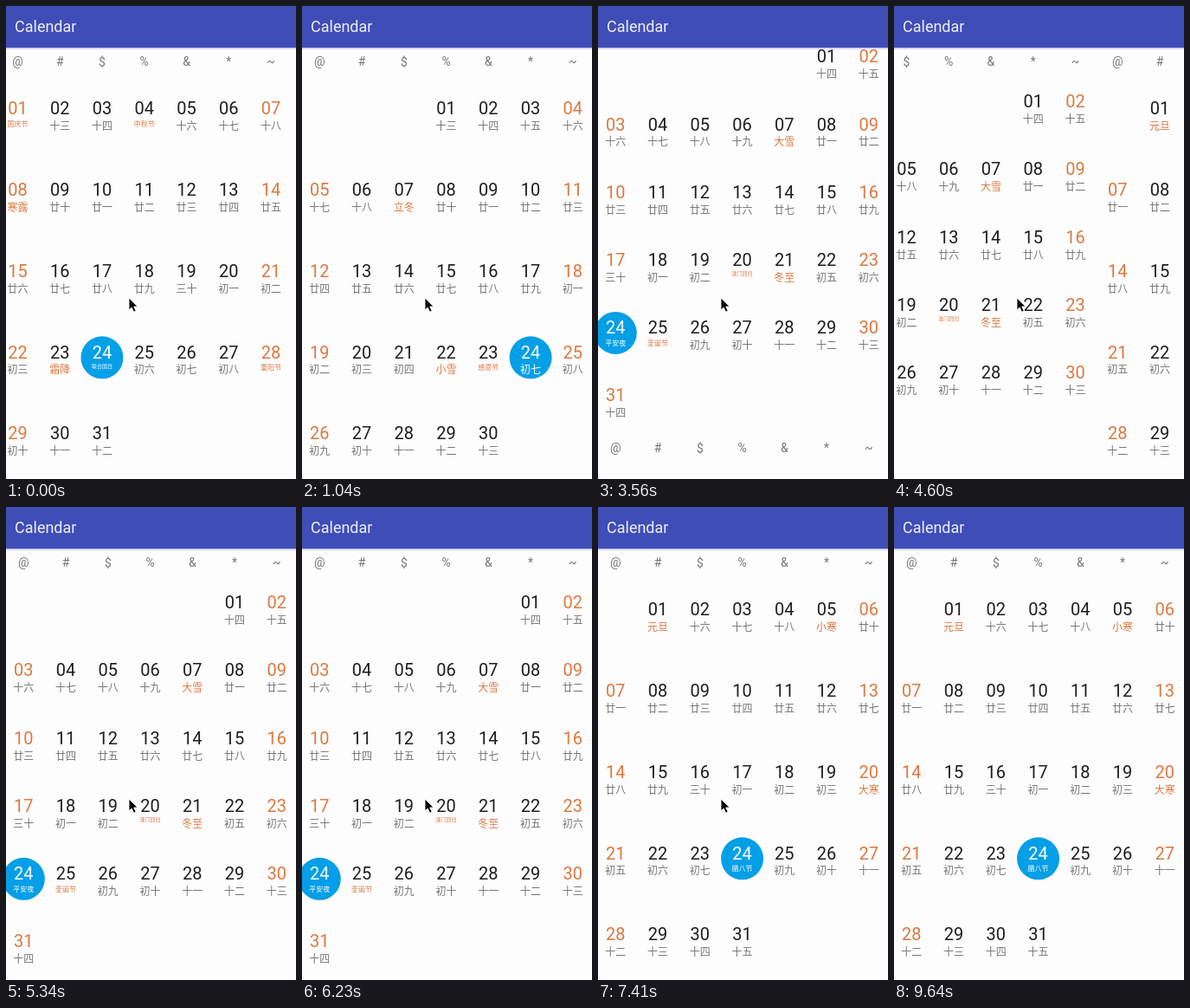
An HTML page that plays this animation: 335x546 px, repeating every 9.92 s.

```html
<!DOCTYPE html>
<html lang="zh-CN">
<head>
<meta charset="utf-8">
<title>Calendar</title>
<style>
html, body { margin: 0; width: 100%; height: 100%; overflow: hidden; background: #fdfdfd; }
svg { display: block; width: 335px; height: 546px; }
text { font-family: Roboto, "Noto Sans CJK SC", "Noto Sans CJK", sans-serif; }
.mid { text-anchor: middle; }
.week { font-size: 14px; fill: #757575; }
.day { font-size: 20px; fill: #1e1e1e; }
.lunar { font-family: "Noto Sans CJK SC", "Noto Sans CJK", sans-serif; fill: #757575; }
.hot { fill: #dd7840; }
.on { fill: #fff; }
</style>
</head>
<body>
<svg id="stage" viewBox="0 0 335 546">
  <defs>
    <linearGradient id="shade" x1="0" y1="0" x2="0" y2="1">
      <stop offset="0" stop-color="#8f97cf" stop-opacity=".75"/>
      <stop offset="1" stop-color="#d5d8ec" stop-opacity="0"/>
    </linearGradient>
  </defs>
  <g id="pages"></g>
  <rect y="48" width="335" height="3" fill="url(#shade)"/>
  <rect width="335" height="48" fill="#3f4db7"/>
  <text x="10" y="30.3" font-size="18" fill="#eef0fb">Calendar</text>
  <path id="cursor" d="M142 337v14l3.2-3 2.4 5.2 2.6-1.1-2.4-5.1h4.4z" fill="#000" stroke="#fff" stroke-width=".9"/>
</svg>
<script>
const LOOP = 9920, TICK = 148.3, LAST = 65;
const COL = 48.76, LEFT = 20.3, WIDE = COL * 7, TALL = 498;
const TOP = 71, GRID = 469.3, PICKED = 24;
const DIGITS = '一二三四五六七八九十';

// first: weekday of day 1; moon: lunar day of day 1; len: days in that lunar month
const MONTHS = [
  { days: 31, first: 0, moon: 12, len: 30, feasts: { 1: '国庆节', 4: '中秋节', 8: '寒露', 23: '霜降', 24: '联合国日', 28: '重阳节' } },
  { days: 30, first: 3, moon: 13, len: 29, feasts: { 7: '立冬', 22: '小雪', 23: '感恩节' } },
  { days: 31, first: 5, moon: 14, len: 30, feasts: { 7: '大雪', 20: '澳门回归', 22: '', 21: '冬至', 24: '平安夜', 25: '圣诞节' } },
  { days: 31, first: 1, moon: 15, len: 30, feasts: { 1: '元旦', 5: '小寒', 20: '大寒', 24: '腊八节' } }
];

// Swipes: starting tick, pages, direction and progress at each tick
const SWIPES = [
  { at: 0, from: 0, to: 1, steps: [.02, .15, .41, .7, .91, .985, 1] },
  { at: 12, from: 1, to: 2, vertical: true, steps: [.02, .14, .38, .66, .898, .98, 1] },
  { at: 23, from: 2, to: 3, vertical: true, steps: [.02, .104, .52, .9, 1] },
  { at: 28, from: 3, to: 2, steps: [.03, .17, .43, .697, .9, .98, 1] },
  { at: 44, from: 2, to: 3, steps: [.03, .18, .5, .8, .96, 1] }
];
const EXIT = { at: 62, path: [[20, 22], [75, 85], [150, 165], [210, 230]] };

function add(parent, tag, attrs, label) {
  const node = document.createElementNS('http://www.w3.org/2000/svg', tag);
  for (const key in attrs) node.setAttribute(key, attrs[key]);
  if (label) node.textContent = label;
  return parent.appendChild(node);
}

function lunarName(n) {
  if (n === 30) return '三十';
  return '初十廿'[Math.floor(n / 10.01)] + DIGITS[(n - 1) % 10];
}
// The tenth day is written with the first prefix, the twentieth with the third
const moonLabel = n => n === 20 ? '廿十' : lunarName(n);

function buildPage(month) {
  const page = add(document.getElementById('pages'), 'g', {});
  [...'@#$%&*~'].forEach((sign, c) =>
    add(page, 'text', { class: 'mid week', x: LEFT + c * COL, y: 69 }, sign));
  const rows = Math.ceil((month.first + month.days) / 7), pitch = GRID / rows;
  for (let d = 1; d <= month.days; d++) {
    const cell = month.first + d - 1, col = cell % 7;
    const x = LEFT + col * COL, y = TOP + (Math.floor(cell / 7) + .5) * pitch;
    const feast = month.feasts[d];
    const label = feast || moonLabel((month.moon + d - 2) % month.len + 1);
    const size = 24 / label.length;
    const picked = d === PICKED;
    const tone = hot => picked ? ' on' : hot ? ' hot' : '';
    if (picked) add(page, 'circle', { cx: x, cy: y + 6.3, r: 24.5, fill: '#049fe7' });
    add(page, 'text', { class: 'mid day' + tone(col % 6 === 0), x, y: y + 7.1 }, String(d).padStart(2, '0'));
    add(page, 'text', { class: 'mid lunar' + tone(feast), x, y: y + 12 + size * 1.08, 'font-size': size }, label);
  }
  return page;
}

const pages = MONTHS.map(buildPage);
const cursor = document.getElementById('cursor');

function draw(time) {
  const tick = Math.min(LAST, Math.floor((time % LOOP + 6) / TICK));
  const swipe = SWIPES.filter(s => s.at <= tick).pop();
  const done = swipe.steps[Math.min(tick - swipe.at, swipe.steps.length - 1)];
  const pos = swipe.from + (swipe.to - swipe.from) * done;
  pages.forEach((page, i) => {
    const shift = i - pos;
    const x = swipe.vertical ? 0 : shift * WIDE, y = swipe.vertical ? shift * TALL : 0;
    page.setAttribute('display', Math.abs(shift) < 1 ? 'inline' : 'none');
    page.setAttribute('transform', `translate(${x.toFixed(2)} ${y.toFixed(2)})`);
  });
  const [cx, cy] = tick < EXIT.at ? [0, 0] : EXIT.path[tick - EXIT.at];
  cursor.setAttribute('transform', `translate(${cx} ${cy})`);
}

const start = performance.now();
function frame() {
  draw(performance.now() - start);
  requestAnimationFrame(frame);
}
frame();
</script>
</body>
</html>
```
